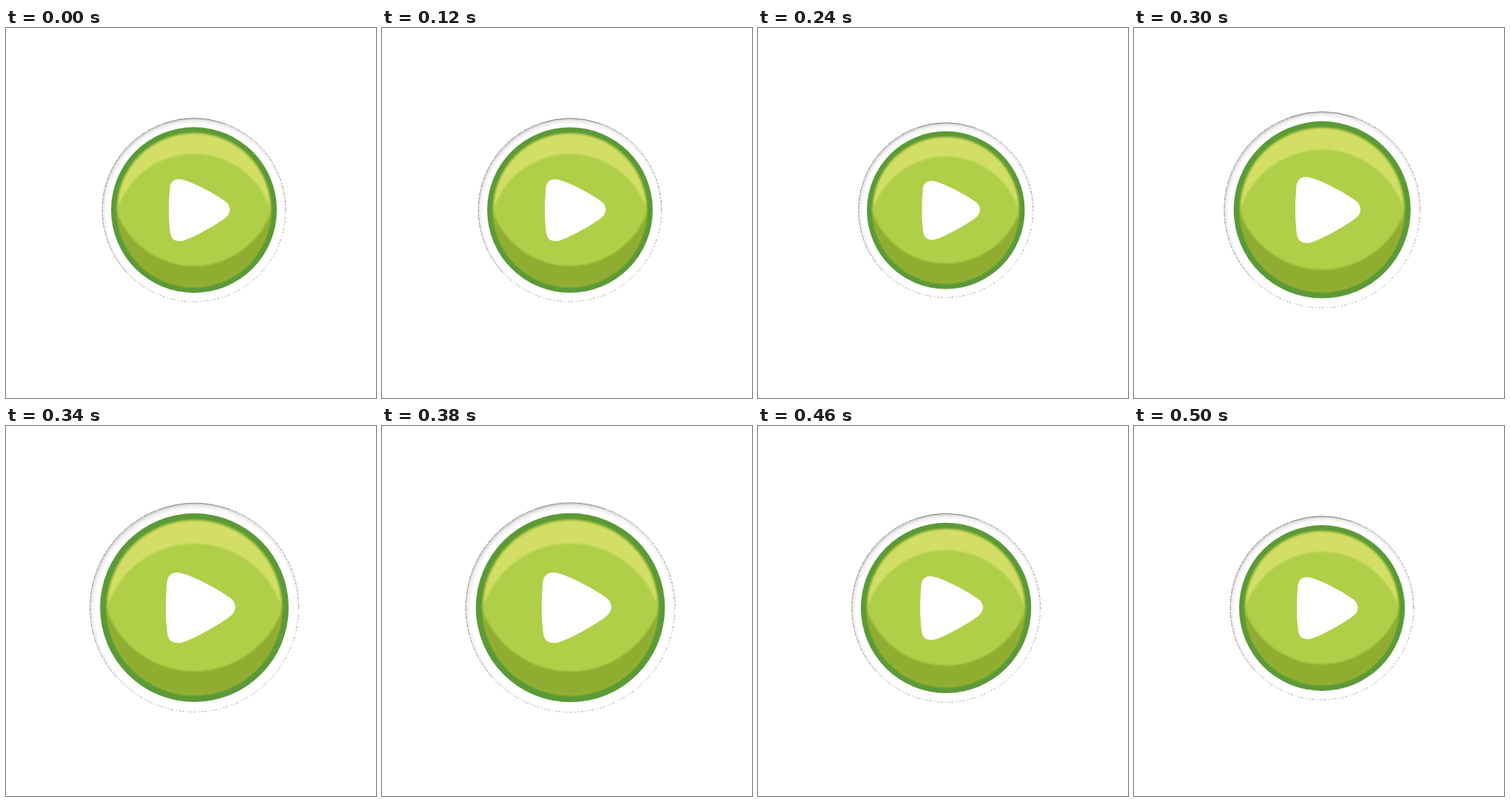
An HTML page that plays this animation: 500 by 500 pixels, repeating every 600 ms.

```html
<!DOCTYPE html>
<html lang="en">
<head>
<meta charset="utf-8">
<title>Play button</title>
<style>
  html, body { margin: 0; width: 100%; height: 100%; overflow: hidden; background: #fff; }
  svg { display: block; width: 500px; height: 500px; }
  .rim { fill: none; stroke: #333; stroke-width: .8; vector-effect: non-scaling-stroke; }
</style>
</head>
<body>
<svg viewBox="0 0 500 500">
  <defs>
    <radialGradient id="shade" gradientUnits="userSpaceOnUse" cx="255.5" cy="249" r="127">
      <stop offset=".94" stop-color="#fff"/>
      <stop offset=".975" stop-color="#ededed"/>
      <stop offset="1" stop-color="#c4c4c4"/>
    </radialGradient>
    <filter id="soft" x="-5%" y="-5%" width="110%" height="110%" color-interpolation-filters="sRGB">
      <feGaussianBlur stdDeviation=".9"/>
    </filter>
    <clipPath id="disc"><circle cx="254" cy="246" r="104.5"/></clipPath>
  </defs>
  <g id="button">
    <circle cx="254" cy="246" r="124" fill="url(#shade)"/>
    <path class="rim" d="M214 128.6A124 124 0 0 1 294 128.6" opacity=".65"/>
    <path class="rim" d="M162 329.1A124 124 0 0 1 214 128.6" stroke-dasharray="5 1 3 2" opacity=".6"/>
    <path class="rim" d="M294 128.6A124 124 0 0 1 378 246" stroke-dasharray="4 2 2 2" opacity=".6"/>
    <path class="rim" d="M378 246A124 124 0 0 1 162 329.1" stroke-dasharray="2 3 1 4 3 2" opacity=".55"/>

    <circle cx="254" cy="246" r="112" fill="#5b9a37"/>
    <g filter="url(#soft)">
      <g clip-path="url(#disc)">
        <rect x="149" y="141" width="210" height="107" fill="#d3de66"/>
        <rect x="149" y="248" width="210" height="104" fill="#90ad31"/>
        <path d="M149.5 248A109 109 0 0 1 358.5 248A111 111 0 0 1 149.5 248Z" fill="#b0cf48"/>
        <circle cx="254" cy="246" r="103.7" fill="none" stroke="#a3b936" stroke-width="1.8" opacity=".7"/>
      </g>
    </g>
    <path fill="#fff" d="M221.3 217C222 208 227 203.500 236 204.500C250 207 281 223 296 234C304.500 240 304.500 250 297 256C283 267 250 285 238 287.800C228 289 223 285 222 277C219.500 258 219.500 240 221.300 217Z"/>
  </g>
</svg>
<script>
  const button = document.getElementById('button');
  const LOOP = 600, STEP = 20, LAST = 20;

  // [step, scale]: shrink, overshoot, settle
  const keys = [[0.5, 1], [6, 0.942], [13, 1.148], [20, 1]];
  const ease = p => (1 - Math.cos(Math.PI * p)) / 2;

  function scaleAt(step) {
    if (step <= keys[0][0]) return 1;
    const i = keys.findIndex(key => step <= key[0]);
    const [s0, a] = keys[i - 1], [s1, b] = keys[i];
    return a + (b - a) * ease((step - s0) / (s1 - s0));
  }

  function draw(now) {
    const t = now % LOOP;
    const step = Math.min(LAST, Math.max(0, Math.floor((t - 100) / STEP)));
    const s = scaleAt(step);
    button.setAttribute('transform', `translate(250 250) scale(${s}) translate(-250 -250)`);
    requestAnimationFrame(draw);
  }

  let start;
  requestAnimationFrame(function begin(now) {
    start = now;
    const tick = time => {
      const t = (time - start) % LOOP;
      const step = Math.min(LAST, Math.max(0, Math.floor((t - 100) / STEP)));
      button.setAttribute('transform',
        `translate(250 250) scale(${scaleAt(step)}) translate(-250 -250)`);
      requestAnimationFrame(tick);
    };
    tick(now);
  });
</script>
</body>
</html>
```
